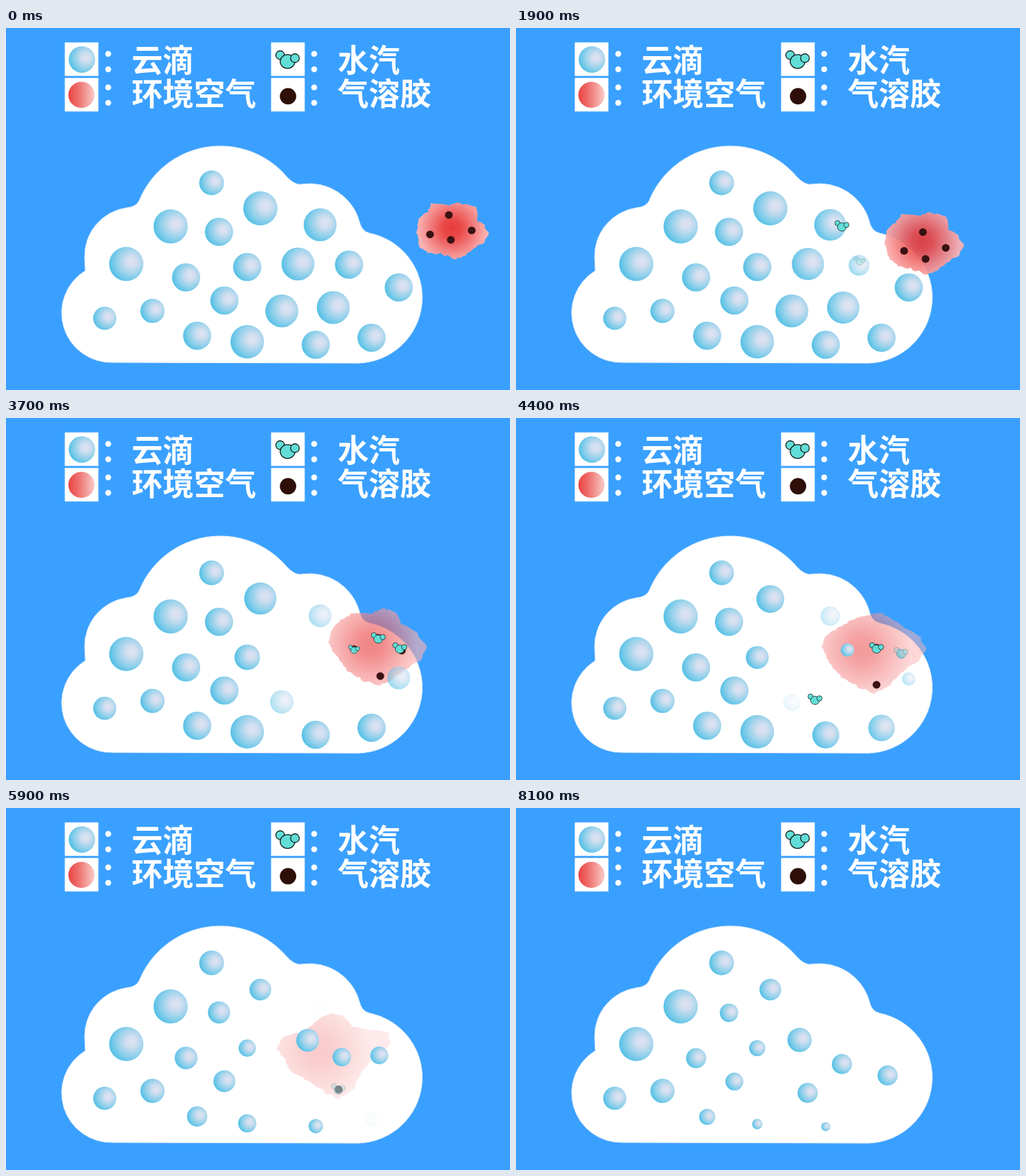
Recreate the animation shown at these times as an HTML page. Size 750 by 540 pixels, loop 8.2 s.

```html
<!DOCTYPE html>
<html lang="zh-CN">
<head>
<meta charset="utf-8">
<title>云滴蒸发</title>
<style>
html, body { margin: 0; width: 100%; height: 100%; overflow: hidden; background: #3aa0ff; }
svg { display: block; width: 750px; height: 540px; }
text { font: 700 46.4px "Noto Sans CJK SC", "Noto Sans CJK", sans-serif; fill: #fff; }
</style>
</head>
<body>
<svg viewBox="0 0 750 540">
  <defs>
    <radialGradient id="water" cx=".65" cy=".43" r=".66">
      <stop offset="0" stop-color="#e0e3f3"/>
      <stop offset=".25" stop-color="#d0deef"/>
      <stop offset=".65" stop-color="#8fd0eb"/>
      <stop offset="1" stop-color="#52bfe5"/>
    </radialGradient>
    <linearGradient id="warm">
      <stop offset="0" stop-color="#e94444"/>
      <stop offset=".35" stop-color="#ee6b69"/>
      <stop offset="1" stop-color="#f9cbc8"/>
    </linearGradient>
    <radialGradient id="heat" gradientUnits="userSpaceOnUse">
      <stop offset="0" stop-color="#e83a3a"/>
      <stop offset=".25" stop-color="#ea4848"/>
      <stop offset=".95" stop-color="#fbb2b2"/>
    </radialGradient>
    <g id="vapor" fill="#62ddd7" stroke="#14201f" stroke-width="1.3">
      <circle cx="-11" cy="-6.5" r="6.5"/>
      <ellipse cy="3" rx="11" ry="10.3"/>
      <circle cx="11" cy="-2" r="6.5"/>
    </g>
  </defs>
  <rect width="750" height="540" fill="#3aa0ff"/>
  <g fill="#fff">
    <path d="M87.5 21.5h50v50h-50zM87.5 74.5h50v50h-50zM394.5 21.5h50v50h-50zM394.5 74.5h50v50h-50z"/>
    <path stroke="#d5e8fb" d="M159 499A74 74 0 0 1 118 362L117 342A73 73 0 0 1 180 268Q193 267 198 258A130 130 0 0 1 418 222Q430 235 440 233A77 77 0 0 1 526 289Q529 303 541 306A98 98 0 0 1 524 500Z"/>
  </g>
  <circle cx="113" cy="47" r="19.7" fill="url(#water)"/>
  <circle cx="112.3" cy="99.8" r="19.5" fill="url(#warm)"/>
  <use href="#vapor" x="419" y="47"/>
  <circle cx="419.7" cy="101.8" r="12.2" fill="#2e0f08"/>
  <text x="140.5" y="64.5">：云滴</text>
  <text x="140.5" y="115">：环境空气</text>
  <text x="447" y="64.5">：水汽</text>
  <text x="447" y="115">：气溶胶</text>
  <path id="air" fill="url(#heat)"/>
  <g id="parts"></g>
</svg>
<script>
const LOOP = 8200, STEP = 100;
const $ = id => document.getElementById(id);
const parts = $("parts"), air = $("air"), heat = $("heat");
const updates = [];

function add(tag, attrs) {
  const el = document.createElementNS("http://www.w3.org/2000/svg", tag);
  set(el, attrs);
  return parts.appendChild(el);
}

function set(el, attrs) {
  for (const k in attrs) el.setAttribute(k, attrs[k]);
}

// Keys are [time, ...values]; result is the values at time t.
function at(keys, t) {
  const n = keys.findIndex(k => k[0] > t);
  if (n < 0) return keys[keys.length - 1].slice(1);
  if (n === 0) return keys[0].slice(1);
  const a = keys[n - 1], b = keys[n], f = (t - a[0]) / (b[0] - a[0]);
  return a.slice(1).map((v, i) => v + (b[i + 1] - v) * f);
}

// Cloud droplet; size keys are [time, radius, opacity].
function drop(x, y, r, ...keys) {
  const el = add("circle", { cx: x, cy: y, r, fill: "url(#water)" });
  if (keys.length) updates.push(t => {
    const [size, opacity] = at(keys, t);
    set(el, { cy: y + (r - size) * .2, r: size, opacity });
  });
}

// Aerosol grain that later becomes a droplet.
function grain(path, size) {
  const dot = add("circle", { r: 5.8, fill: "#3a1212" });
  const ball = add("circle", { fill: "url(#water)" });
  updates.push(t => {
    const [cx, cy] = at(path, t), [r, o] = at(size, t);
    set(dot, { cx, cy, opacity: Math.max(0, 1 - 1.2 * o) });
    set(ball, { cx, cy, r, opacity: o });
  });
}

// Water vapor; keys are [time, x, y, opacity].
function vapor(scale, ...keys) {
  const el = add("use", { href: "#vapor" });
  updates.push(t => {
    const [x, y, opacity] = at(keys, t);
    set(el, { transform: `translate(${x} ${y}) scale(${scale})`, opacity });
  });
}

// Ambient air: outline corners at a few times, plus a ragged edge.
const pairs = s => s.split(" ").map(p => p.split(",").map(Number));
const shift = (pts, dx, dy) => pts.map(([x, y]) => [x + dx, y + dy]);
const start = pairs("612,306 613,285 628,273 632,262 660,264 674,261 700,267 701,288 712,293 718,309 707,323 696,329 684,338 670,345 650,337 628,335 614,326 613,316");
const middle = pairs("481,335 483,318 495,303 513,292 545,291 563,284 580,290 588,307 612,320 626,343 614,364 592,377 576,389 557,399 530,391 508,377 494,358 483,344");
const late = pairs("431,349 434,336 455,327 478,314 509,294 528,299 546,315 572,321 592,333 594,350 572,370 551,386 538,406 512,423 489,412 461,396 445,383 437,364");
const end = pairs("375,368 388,347 425,341 440,326 453,317 480,325 487,338 510,340 548,336 549,357 525,381 507,399 499,428 480,446 462,437 430,413 400,402 392,388");
const outline = [
  [0, start], [1.2, shift(start, -36, 11)], [3.7, middle],
  [5.1, late], [6.7, end], [7.3, shift(end, -20, 10)]
].map(([t, pts]) => [t, ...pts.flat()]);
const glow = [[0, 664, 299, 54], [1.2, 628, 310, 54], [3.7, 543, 338, 74], [5.1, 487, 352, 80], [6.7, 445, 372, 85]];
const fade = [[1.4, 1], [2.7, .8], [3.7, .62], [5.1, .4], [6.7, .13], [7.2, 0]];

let seed = 7;
const rand = () => (seed = seed * 16807 % 2147483647) / 2147483647;
const CUTS = 5;
const jitter = Array.from({ length: start.length * CUTS * 2 }, () => (rand() - .5) * 3);

updates.push(t => {
  const v = at(outline, t), n = v.length / 2, pts = [];
  for (let i = 0; i < n; i++) {
    const j = (i + 1) % n;
    for (let c = 0; c < CUTS; c++) {
      const f = c / CUTS, m = (i * CUTS + c) * 2;
      const x = v[2 * i] + (v[2 * j] - v[2 * i]) * f + jitter[m];
      const y = v[2 * i + 1] + (v[2 * j + 1] - v[2 * i + 1]) * f + jitter[m + 1];
      pts.push(x.toFixed(1) + " " + y.toFixed(1));
    }
  }
  const [cx, cy, r] = at(glow, t);
  set(heat, { cx, cy, r });
  set(air, { d: "M" + pts.join("L") + "Z", opacity: at(fade, t)[0] });
});

// Droplets that stay
drop(306, 231, 18.5);
drop(245, 296, 25.5);
drop(179, 352, 25.5);
drop(147, 433, 17.3);
drop(218, 422, 18);

// Droplets that shrink
drop(378.5, 269, 25.5, [3.3, 25.5, 1], [3.7, 24, 1], [5.1, 17.5, 1], [5.6, 16.2, 1]);
drop(317, 304, 21, [5.1, 21, 1], [6.4, 13.7, 1]);
drop(268, 372, 21, [4.9, 21, 1], [5.1, 20, 1], [6.4, 15, 1]);
drop(359, 356.5, 21, [3, 21, 1], [3.7, 19, 1], [5.1, 15, 1], [6.2, 12, 1]);
drop(325, 406.5, 21, [5.1, 21, 1], [6.4, 13.3, 1]);
drop(284.5, 459, 21, [4.9, 21, 1], [5.1, 20, 1], [6.4, 12, 1]);
drop(359, 468, 25, [4.7, 25, 1], [5.1, 23, 1], [6.4, 7.7, 1]);
drop(461, 472.5, 21, [4.2, 21, 1], [5.1, 17, 1], [6.4, 6.7, 1]);

// Droplets that evaporate
drop(467.5, 293.5, 24.5, [1.7, 24.5, 1], [2.7, 20.5, .75], [3.7, 17, .5], [5.1, 12, .2], [6, 9, 0]);
drop(434.5, 352, 24.5, [1.8, 24.5, 1], [2.7, 20.5, .5], [3.5, 17, 0]);
drop(510.5, 353, 21, [1.1, 21, 1], [2.7, 10, .17], [2.9, 8, 0]);
drop(584.5, 387, 21, [2.4, 21, 1], [2.7, 21, .88], [3.7, 17, .6], [5.1, 3, .25], [5.3, 1, 0]);
drop(410.5, 422, 24.5, [2.7, 24.5, 1], [3.7, 17.5, .5], [4.7, 11, 0]);
drop(487, 417, 24.5, [1.8, 24.5, 1], [2.7, 20.5, .5], [3.5, 17, 0]);
drop(544, 462, 21, [4.2, 21, 1], [5.1, 15.5, .45], [6, 10, 0]);

grain([[0, 659, 279], [1.1, 629, 295], [2.7, 582, 314], [3.7, 554, 328], [5.1, 519.5, 357.5], [6.5, 485, 382]],
  [[4.5, 8, 0], [5.1, 12, .78], [5.5, 13, 1], [6.6, 15, 1]]);
grain([[0, 631, 308], [1.1, 602, 324], [2.7, 553, 341], [3.7, 518, 345], [5.1, 468.5, 347], [6.7, 429.5, 346], [7, 422, 346]],
  [[3.8, 5, 0], [4.4, 10, 1], [5.1, 15.7, 1], [6.5, 18, 1]]);
grain([[0, 662, 316], [1.1, 633, 332], [2.7, 586, 357], [3.7, 557, 385], [5.1, 516, 411], [6.7, 474, 429], [8.1, 434, 425]],
  [[5.5, 5, 0], [6.7, 11, .7], [7.3, 13, 1], [8.1, 15, 1]]);
grain([[0, 693, 302], [1.1, 663, 318], [2.7, 616, 338], [3.7, 589, 347], [5.1, 558.5, 356], [6.7, 552.5, 382], [8.1, 553, 399]],
  [[4, 5, 0], [4.6, 9, 1], [5.1, 11.5, 1], [6.7, 15, 1]]);

vapor(.6, [1.7, 475, 294, 0], [1.9, 485, 295, 1], [2.7, 533, 304, 1], [3.7, 554, 328, 1], [4.5, 534, 345, 1], [4.9, 524, 354, 0]);
vapor(.47, [1.8, 511, 350, 0], [2.1, 513, 343, 1], [2.7, 519.5, 325.5, 1], [3.7, 518, 345, 1], [4, 507, 346, 1], [4.3, 496, 346, 0]);
vapor(.6, [2.8, 584, 384, 0], [3, 585, 378, 1], [3.7, 586, 343, 1], [4.2, 577, 348, 1], [4.5, 571, 351, 0]);
vapor(.6, [3.9, 415, 424, 0], [4.2, 430, 422, 1], [5.1, 497.5, 410.5, 1], [5.6, 502, 416, 1], [6, 492, 420, 0]);

const begin = performance.now();
function draw() {
  const ms = (performance.now() - begin) % LOOP;
  const t = Math.floor(ms / STEP) * STEP / 1000;
  updates.forEach(u => u(t));
  requestAnimationFrame(draw);
}
draw();
</script>
</body>
</html>
```
